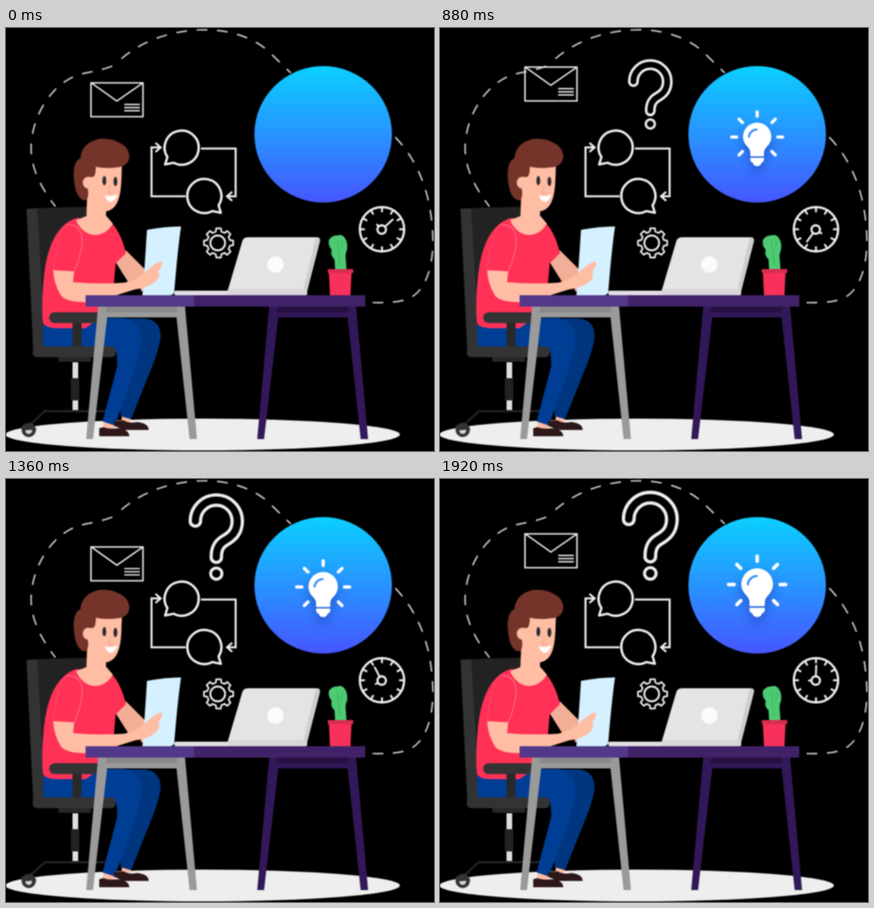
An HTML page with a canvas that plays this animation: 753x744 px, repeating every 2.16 s.

```html
<!DOCTYPE html>
<html lang="en">
<head>
<meta charset="utf-8">
<title>Working at a desk</title>
<style>
html, body { margin: 0; width: 100%; height: 100%; overflow: hidden; background: #000; }
canvas { display: block; filter: blur(.85px); }
</style>
</head>
<body>
<canvas id="stage" width="753" height="744"></canvas>
<script>
const W = 753, H = 744, LOOP = 2160, STEP = 80, LAST = 1920;
const LINE = '#eeeeee', DASH = '#c8c8c8', SKIN = '#ffbda3', HAIR = '#75342a', RED = '#ff3157', GREY = '#333334';
const stage = document.getElementById('stage').getContext('2d');
const back = document.createElement('canvas');
back.width = W;
back.height = H;
let c = back.getContext('2d');

function fill(d, color) {
  c.fillStyle = color;
  c.fill(new Path2D(d));
}

function stroke(d, color, width, cap = 'butt', join = 'miter') {
  c.strokeStyle = color;
  c.lineWidth = width;
  c.lineCap = cap;
  c.lineJoin = join;
  c.stroke(new Path2D(d));
}

function oval(x, y, rx, ry, color) {
  c.fillStyle = color;
  c.beginPath();
  c.ellipse(x, y, rx, ry, 0, 0, 7);
  c.fill();
}

function ring(x, y, r, width, color = LINE) {
  c.strokeStyle = color;
  c.lineWidth = width;
  c.beginPath();
  c.arc(x, y, r, 0, 7);
  c.stroke();
}

function box(x, y, w, h, color, r = 0) {
  c.fillStyle = color;
  c.beginPath();
  c.roundRect(x, y, w, h, r);
  c.fill();
}

function polar(r, deg) {
  const a = deg * Math.PI / 180;
  return [r * Math.sin(a), -r * Math.cos(a)];
}

function drawCloud() {
  c.setLineDash([19, 17]);
  stroke('M187 67C164 76 146 77 129 82C88 94 54 140 46 190C38 234 56 274 87 314', DASH, 2.7);
  stroke('M203 54C245 18 300 3 352 3C398 4 438 18 464 43L501 79', DASH, 2.7);
  stroke('M685 192C730 240 749 300 751 370C752 420 738 462 710 475C690 484 668 483 640 483', DASH, 2.7);
  c.setLineDash([]);
}

function drawGlobe() {
  const g = c.createLinearGradient(0, 67, 0, 307);
  g.addColorStop(0, '#0bd0ff');
  g.addColorStop(1, '#4656ff');
  oval(558, 187, 121, 120, g);
}

function drawChat() {
  stroke('M284 227A30 30 0 1 1 295 237L280 240Z', LINE, 4.2, 'round', 'round');
  stroke('M374 312A30 30 0 1 0 363 322L378 325Z', LINE, 4.2, 'round', 'round');
  stroke('M343 212H404V296H390M398 288L389 296L398 304', LINE, 3.6);
  stroke('M316 296H256V210H271M263 202L272 210L263 218', LINE, 3.6);
}

function drawGear() {
  const p = [];
  for (let i = 0; i < 8; i++) {
    for (const [r, a] of [[20.5, -14], [26, -9], [26, 9], [20.5, 14]]) {
      const [x, y] = polar(r, i * 45 + a);
      p.push((374 + x) + ' ' + (378 + y));
    }
  }
  stroke('M' + p.join('L') + 'Z', LINE, 3, 'butt', 'round');
  ring(372.5, 378, 13, 3.4);
}

function drawDial() {
  ring(661.5, 354, 39, 4);
  for (let a = 0; a < 360; a += 30) {
    const [x, y] = polar(1, a);
    stroke(`M${661.5 + x * 30} ${354 + y * 30}L${661.5 + x * 38} ${354 + y * 38}`, LINE, 3.4);
  }
}

function drawChair() {
  fill('M50 317L150 314L150 562H60Z', '#222223');
  fill('M36 318L55 317L69 562L48 568Z', GREY);
  box(92, 578, 58, 9, '#272728', 3);
  box(117, 588, 10, 84, '#dedede');
  box(114, 616, 15, 39, '#222');
  stroke('M40 700L68 674H178', '#222', 4);
  oval(40, 707, 12.5, 12.5, '#333');
  oval(40, 708, 6, 6, '#d5d5d5');
  fill('M27 700L45 694L54 706L28 708Z', '#333');
}

function drawLegs() {
  fill('M204 682L220 687L217 694H203Z', SKIN);
  fill('M172 691L192 697L189 706H170Z', SKIN);
  fill('M190 511H245Q272 514 272 543Q270 565 252 608L220 688L202 683Z', '#00367f');
  fill('M65 523L165 510H208Q239 515 238 552Q236 580 191 699L170 692L199 582Q196 560 168 560H66Z', '#003e95');
  fill('M190 691L207 690Q216 696 231 693Q251 695 251 707H204Q196 701 190 700Z', '#2d1718');
  fill('M164 704L171 702Q182 706 195 704Q216 705 217 718H164Z', '#2d1718');
}

function drawPerson() {
  drawLegs();
  fill('M195 400L211 391L247 427L238 449L215 447L193 412Z', '#f3ae97');
  fill('M125 334Q104 340 89 362Q70 392 66 446Q62 490 65 518Q68 528 92 528H140L163 512' +
    'V480L188 470L193 414L211 396Q203 362 187 344Z', RED);
  fill('M123 338L141 331L177 331L188 344Q176 364 156 364Q135 363 123 338Z', SKIN);
  fill('M143 288L176 312V345H141Z', SKIN);
  fill('M147 237L204 240L203 268Q202 292 197 304Q190 322 172 323Q148 320 143 288Z', SKIN);
  fill('M131 229Q119 234 119 258Q120 284 127 295Q135 306 142 302Q147 293 143 280L153 262' +
    'Q158 260 158 244Q176 248 196 245Q214 244 217 228Q217 211 202 203Q186 193 164 195' +
    'Q133 202 131 229Z', HAIR);
  oval(145, 272, 10, 10.5, SKIN);
  fill('M148 262L160 262V284H148Z', SKIN);
  oval(173, 268.5, 3.4, 8.2, '#2e2d31');
  oval(192.5, 270, 3.4, 8.2, '#2e2d31');
  stroke('M184 276L180 289Q183 293 188 290', '#efa58e', 1.5);
  fill('M174 294Q186 298 196 292Q193 305 184 306Q176 304 174 294Z', '#fff');
}

function drawArm() {
  fill('M234 450L250 446V463H238Z', '#f3ae97');
  fill('M248 355Q280 349 308 349Q302 390 296 464Q295 470 287 470H240Q244 420 248 355Z', '#d5f0ff');
  fill('M83 426L120 428L118 447Q160 451 208 448Q232 442 243 431Q264 411 274 411' +
    'Q277 416 268 428Q272 438 263 446Q250 457 226 460Q190 472 152 482Q108 484 97 471' +
    'Q84 450 83 426Z', SKIN);
  stroke('M106 346Q135 344 134 378Q131 404 120 428', '#ff8296', 1.2);
  stroke('M106 346Q90 362 83 426', '#ff5470', 1);
}

function table(x, main, bar) {
  c.save();
  c.translate(x, 0);
  fill('M0 490H153L174 723H161L138 509H16L-9 723H-21Z', main);
  fill('M14 490H139V500H13Z', bar);
  c.restore();
}

function drawDesk() {
  box(296, 462, 110, 8, '#e1dfe2', 3);
  fill('M426 368H546Q554 368 552 376L530 462H390L416 374Q418 368 426 368Z', '#e5e3e5');
  fill('M545 368Q554 367 552 376L530 462H523Z', '#cecdd0');
  box(390, 459, 140, 11, '#d8d6d9', 3);
  oval(474, 416, 14.5, 14.5, '#fbfbfb');
  fill('M579 425L578 407Q570 400 573 390Q566 382 568 373Q574 364 582 365Q591 362 596 369' +
    'Q602 378 600 390Q596 399 598 408L599 425Z', '#4ecb72');
  stroke('M583 374L588 418M592 374L590 390', '#38aa5d', 1.2);
  fill('M568 429H608L606 470H570Z', '#f8315a');
  box(566, 424, 45, 7, '#d92b50', 1);
  box(140, 470, 492, 20, '#412268');
  box(140, 470, 191, 20, '#523889');
  table(162, '#9a9a9a', '#898989');
  table(463, '#321859', '#25103f');
}

function drawArmrest() {
  box(117, 515, 16, 48, '#29292a');
  box(76, 500, 100, 19, GREY, 9);
  box(47, 560, 146, 19, GREY, 8);
}

function drawScene() {
  c.fillStyle = '#000';
  c.fillRect(0, 0, W, H);
  drawCloud();
  drawGlobe();
  drawChat();
  drawGear();
  drawDial();
  oval(346, 715, 347, 28, '#eeeeee');
  drawChair();
  drawPerson();
  drawArm();
  drawArmrest();
  drawDesk();
}

// Eased value through [time, value] keys.
function track(keys, t) {
  if (t <= keys[0][0]) return keys[0][1];
  for (let i = 1; i < keys.length; i++) {
    const [t0, a] = keys[i - 1], [t1, b] = keys[i];
    if (t <= t1) {
      const k = (t - t0) / (t1 - t0);
      return a + (b - a) * k * k * (3 - 2 * k);
    }
  }
  return keys[keys.length - 1][1];
}

const mailKeys = [[0, 96.5], [640, 47.5], [1310, 120], [1920, 96.5]];
const bulbKeys = [[190, 0], [1110, 1.02], [1340, 0.893], [1920, 0.965]];
const askKeys = [[510, 0], [1080, 1.012], [1460, 0.875], [1920, 0.925]];
const handKeys = [[0, 48], [1680, 362]];

function scaled(x, y, s, draw) {
  if (s <= 0) return;
  c.save();
  c.translate(x, y);
  c.scale(s, s);
  c.translate(-x, -y);
  draw(s);
  c.restore();
}

function drawMail(y) {
  c.save();
  c.translate(0, y);
  stroke('M149.5 0H241V59.5H149.5ZM150 0L195 32L241 0', LINE, 2.6);
  stroke('M208 38H235.5M208 43.5H235.5M208 49H235.5', LINE, 2.3);
  c.restore();
}

function drawHands(deg) {
  const hand = (a, r) => {
    const [x, y] = polar(1, a);
    stroke(`M${661 + x * 8} ${354.5 + y * 8}L${661 + x * r} ${354.5 + y * r}`, LINE, 3.4, 'round');
  };
  ring(661, 354.5, 7.5, 3.8);
  hand(deg, 26);
  hand(deg - 92, 12);
}

function drawBulb(s) {
  c.shadowColor = 'rgba(20,40,140,.45)';
  c.shadowBlur = 20 * s;
  c.shadowOffsetY = 11 * s;
  fill('M544 222V214Q543 208 536 201Q529 193 529 183A29 29 0 0 1 587 183Q587 193 580 201' +
    'Q573 208 572 214V222Q572 223 570 223H546Q544 223 544 222Z' +
    'M546 226H570Q573 226 572 230Q571 235 567 236Q565 243 558 243Q551 243 549 236' +
    'Q545 235 544 230Q543 226 546 226Z', '#fff');
  c.shadowColor = 'transparent';
  stroke('M541 183A17 17 0 0 1 557 168', '#2a8dff', 4, 'round');
  stroke('M558 132V141M506 183.5H516M600 183.5H610M521 147L528 154M595 147L588 154' +
    'M521 220L528 213M595 220L588 213', '#fff', 6.4, 'round');
}

function drawAsk() {
  const d = 'M329 62A41 41 0 0 1 411 62C411 84 399 93 387 100C375 107 370 116 370 133';
  stroke(d, LINE, 26.5, 'round');
  stroke(d, '#000', 14, 'round');
  ring(370, 165, 11, 5.8);
}

drawScene();
c = stage;

function render(t) {
  c.drawImage(back, 0, 0);
  drawMail(track(mailKeys, t));
  drawHands(track(handKeys, t));
  scaled(558, 243, track(bulbKeys, t), drawBulb);
  scaled(370, 179, track(askKeys, t), drawAsk);
}

const start = performance.now();
function tick(now) {
  const t = Math.max(0, now - start) % LOOP;
  render(Math.min(LAST, Math.floor(t / STEP) * STEP));
  requestAnimationFrame(tick);
}
render(0);
requestAnimationFrame(tick);
</script>
</body>
</html>
```
